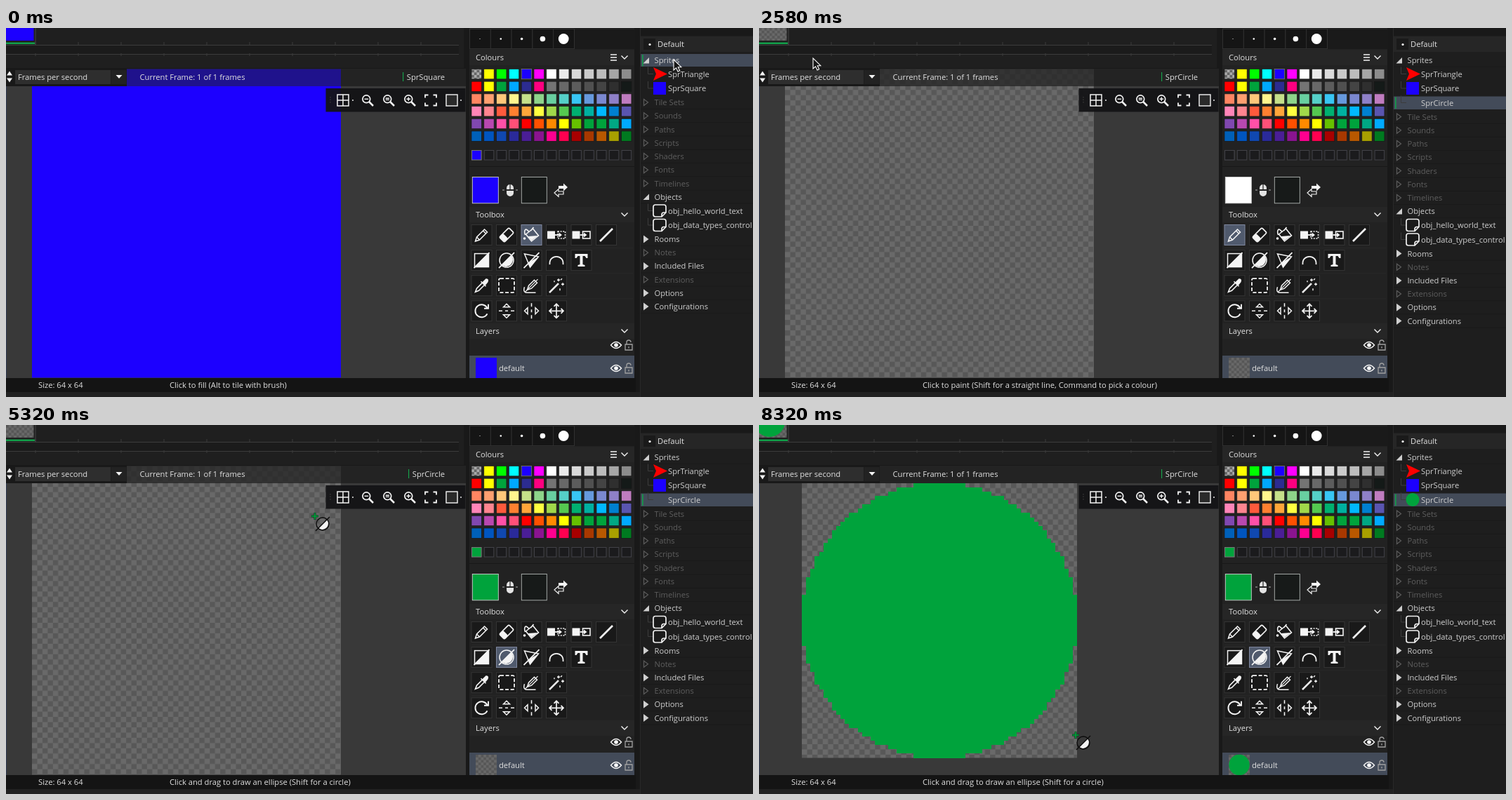
Recreate the animation shown at these times as an HTML page. Size 1064x526 px, loop 8340 ms.

```html
<!DOCTYPE html>
<html lang="en">
<head>
<meta charset="utf-8">
<title>Sprite editor</title>
<style>
html, body { margin: 0; width: 100%; height: 100%; overflow: hidden; background: #1d1d1d; }
svg { display: block; width: 100%; height: 100%; }
text { font: 11.18px "Open Sans", "Noto Sans", sans-serif; white-space: pre; }
</style>
</head>
<body>
<svg id="stage" viewBox="0 0 1064 526"></svg>
<script>
const LOOP = 8340;
const GREEN = '#00a33c', BLUE = '#1c00ff', SELECTED = '#434b59', FIELD = '#2e2e2e', TREE = '#cfcfcf';
const TOOL_ON = '#505a6d', TOOL_HOVER = '#3a4252', TOOL_OFF = '#191919';
const CELL = 7.45;
const NAME = 'SprCircle';
// moments of change, in ms
const CREATE = 420, TYPE = 480, ENTER = 1500, OPEN = 1900, PICK = 3350, ELLIPSE = 4350, ZOOM = 5750, DRAG = 6460, DROP = 8060;

// markup helpers
const rect = (x, y, w, h, fill, more = '') => `<rect x="${x}" y="${y}" width="${w}" height="${h}" fill="${fill}" ${more}/>`;
const path = (d, fill = 'none', stroke = 'none', w = 1.6, more = '') => `<path d="${d}" fill="${fill}" stroke="${stroke}" stroke-width="${w}" ${more}/>`;
const line = (d, w = 1.8, more = '') => path(d, 'none', '#f4f4f4', w, more);
const solid = (d, fill = '#f4f4f4') => path(d, fill);
const dot = (x, y, r, fill = '#fff', more = '') => `<circle cx="${x}" cy="${y}" r="${r}" fill="${fill}" ${more}/>`;
const text = (x, y, s, fill = '#e0e0e0', more = '') => `<text x="${x}" y="${y + 4}" fill="${fill}" ${more}>${s}</text>`;
const group = (more, s) => `<g ${more}>${s}</g>`;
const at = (x, y, s) => group(`transform="translate(${x} ${y})"`, s);
const down = (x, y) => solid(`M${x - 4.5} ${y - 2.5}h9l-4.5 5z`);
const spinner = (x, y) => solid(`M${x - 4} ${y - 2}h8l-4-6zM${x - 4} ${y + 2}h8l-4 6z`);
const chevron = (x, y) => line(`M${x - 4.5} ${y - 2.5}l4.5 4.5 4.5-4.5`, 1.4);
const checker = (id, size, a, b) => `<pattern id="${id}" width="${2 * size}" height="${2 * size}" patternUnits="userSpaceOnUse">
  ${rect(0, 0, 2 * size, 2 * size, a)}${rect(0, 0, size, size, b)}${rect(size, size, size, size, b)}</pattern>`;

// icons, centred on the origin
const lens = inner => dot(-1.7, -1.7, 5.4, 'none', 'stroke="#f4f4f4" stroke-width="1.7"') + line('M2.5 2.5L8 8', 2.5) + line(inner, 1.4);
const zoomOut = lens('M-4.5-1.7h5.6'), zoomFit = lens('M-4.3-2.8h5.2M-4.3-.6h5.2'), zoomIn = lens('M-4.5-1.7h5.6M-1.7-4.5v5.6');
const corners = line('M-8-3.5V-7.5h4.5M3.5-7.5H8v4M8 3.5V7.5H3.5M-3.5 7.5H-8V3.5');
const gridIcon = line('M-8-8H8V8H-8ZM0-8V8M-8 0H8', 1.5) + dot(14, 0, .9);
const boxIcon = rect(-8, -8, 16, 16, '#2a2a2a', 'stroke="#f4f4f4" stroke-width="1.4"') + dot(13, 0, .9);
const eye = line('M-7.5 0Q0-9 7.5 0Q0 9-7.5 0Z', 1.4) + dot(0, 0, 2.8);
const lock = path('M-5-1H5V7H-5ZM-3-1V-4A3 3 0 0 1 3-4M0 2v2.5', 'none', '#a0a0a0', 1.3);
const half = (r, bg) => dot(0, 0, r, bg) + solid(`M${r * .7} ${-r * .7}A${r} ${r} 0 0 1 ${-r * .7} ${r * .7}Z`);
const pencil = line('M-9 9L-7 3L4-8L8-4L-3 7ZM2-6L6-2M-7 3L-3 7', 1.5);
const copyTo = more => rect(-13, -5.5, 11, 11, '#f4f4f4') + rect(2, -5, 10.5, 10, 'none', `stroke="#f4f4f4" stroke-width="1.6" ${more}`) + line('M-2 0H4', 1.8) + solid('M3.5-3.5L8 0L3.5 3.5Z');
const mirror = line('M-11 0h5M-2 0h4M6 0h5', 1.6) + line('M-4.5-5.5L0-10L4.5-5.5ZM-4.5 5.5L0 10L4.5 5.5Z', 1.5);
const tools = [
  [pencil,
   group('transform="rotate(-45)"', rect(-9.5, -5, 19, 10, 'none', 'rx="2" stroke="#f4f4f4" stroke-width="1.7"') + rect(-9, -5, 7, 10, '#f4f4f4', 'rx="2"')),
   line('M-8-1L2-9L10 1L0 9ZM-3-4C-9-12-11-6-9 0M3-11l-4 5', 1.6) + solid('M-5 2L9 1L0 8Z') + dot(-10, 5, 1.8),
   copyTo('stroke-dasharray="2 1.6"'), copyTo(''), line('M-9 9L9-9', 2.6)],
  [rect(-10, -9.5, 20, 19, 'none', 'stroke="#f4f4f4" stroke-width="1.5"') + solid('M10-9.5V9.5H-10Z') + line('M-11 11L11-11'),
   half(10, 'none') + dot(0, 0, 10, 'none', 'stroke="#f4f4f4" stroke-width="1.5"') + line('M-11 11L11-11'),
   line('M-10-9L10-5L-2 10Z', 1.5) + solid('M10-5L-2 10L-5 4Z') + line('M-11 11L11-11'),
   line('M-9.5 6C-11-9 11-9 9.5 6', 1.8),
   solid('M-9-9H9V-3H7L5-6H2V6L5 7V9H-5V7L-2 6V-6H-5L-7-3H-9Z')],
  [line('M-9 9l2-5 8-8 3 3-8 8zM-1-6L6 1', 1.6) + solid('M1-5L6-10Q11-10 9-5L5 0Z'),
   rect(-11, -10, 22, 20, 'none', 'rx="2" stroke="#f4f4f4" stroke-width="1.8" stroke-dasharray="5 2.6"'),
   line('M-6 6l2-6 8-8 4 4-8 8zM-10 2Q-13 11-4 10H6', 1.5) + line('M-9 9L9-9', 1.2),
   line('M-10 10L3-3', 2.6) + line('M3-10v4M1-8h4M9-4v4M7-2h4M8-10l-2 2M-3-7v2M5 4v3', 1.4)],
  [line('M8-4A9 9 0 1 0 8 4M9.5-9.5V-3.5H3.5', 1.9), mirror, group('transform="rotate(90)"', mirror),
   line('M-9 0H9M0-9V9M-3.5-6.5L0-10L3.5-6.5M-3.5 6.5L0 10L3.5 6.5M-6.5-3.5L-10 0L-6.5 3.5M6.5-3.5L10 0L6.5 3.5', 1.7)]
];
const toolX = i => 677.5 + 35.5 * i, toolY = j => 295 + 36.1 * j;

const palette = [
  'url(#swatch) #ffff00 #00ff00 #00ffff #1c00ff #ff00ff #ffffff #eaeaea #dadada #cacaca #bcbcbc #a6a6a6 #8c8c8c',
  '#ff0000 #ffff00 #00a33c #00a8ff #2c2c90 #ff0080 #747474 #686868 #5c5c5c #505050 #444444 #2f2f2f #141a18',
  '#ff8562 #ffa070 #ffc87a #fff58e #c5e08a #8ed48a #68cfa0 #55d0c8 #38c6f4 #6699dd #7a88d0 #8f80c8 #c07cc0',
  '#ff85b8 #ff8590 #ff5a3c #ff8030 #ffa63a #ffff40 #a0d84a #55c850 #00b070 #00b0a0 #00b8ff #0080d0 #5a55b0',
  '#8048b0 #b848b0 #ff50a8 #ff5078 #ff0000 #ff5000 #ff8a00 #ffff00 #66c000 #00a33c #00a33c #00a884 #00aaff',
  '#0060b8 #0055c0 #1048b0 #2a2a9a #4a1e96 #8a1490 #ff0090 #ff0050 #a80000 #a83800 #b85800 #a8a000 #007a20'
];

function colours() {
  let s = rect(660, 2, 236, 28, '#1a1a1a') + rect(660, 31, 235, 22, '#262626') + text(669, 42, 'Colours');
  [.6, 1.3, 1.8, 3.8, 7.4].forEach((r, i) => {
    s += rect(660.5 + 29.8 * i, 1.5, 29.8, 28, '#151515', 'stroke="#303030"') + dot(675 + 29.8 * i, 15.5, r);
  });
  s += line('M861 38h9M861 42h9M861 46h9', 1.7) + chevron(881, 42);
  palette.forEach((row, j) => row.split(' ').forEach((c, i) => {
    s += rect(663 + 17.8 * i, 58.5 + 17.7 * j, 14.3, 14.3, c, 'stroke="#151515" stroke-width=".6"');
  }));
  s += rect(734.2, 58.5, 14.3, 14.3, 'none', 'stroke="#888" stroke-width=".7"');
  for (let i = 0; i < 13; i++) s += rect(663.5 + 17.8 * i, 174.5, 13.5, 13.5, '#1b1b1d', 'stroke="#424248"');
  s += rect(663.5, 174.5, 13.5, 13.5, BLUE, 'id="recent" stroke="#777"');
  s += rect(660, 197, 235, 1, '#181818');
  s += rect(664.3, 212.5, 37, 37.3, BLUE, 'id="ink" stroke="#d0d0d0" stroke-width=".9"') + rect(734.3, 212.5, 36, 37.3, '#171a19', 'stroke="#b0b6b3" stroke-width=".9"');
  s += at(718, 231, path('M-5-1V-3A5 5 0 0 1 5-3V-1ZM-5 1H5V4A5 5 0 0 1-5 4Z', '#e4e4e4') + path('M0-8V0', 'none', '#222', 1.2) + line('M-11 0h3M8 0h3', .7));
  return s + at(790, 231, solid('M-3-6H4V-9.5L10-4L4 1.5V-2H-3Z') + path('M4 2H-3V-1.5L-9 4L-3 9.5V6H4Z', '#222', '#f4f4f4', 1.2));
}

function toolbox() {
  let s = rect(660, 255, 235, 22, '#262626') + text(669, 265.5, 'Toolbox') + chevron(881, 266);
  tools.forEach((row, j) => {
    if (j) s += rect(663, toolY(j) - 18, 230, 1, '#292929');
    row.forEach((icon, i) => {
      s += at(toolX(i), toolY(j), rect(-14.5, -14.5, 29, 29, TOOL_OFF, `id="tool${j}${i}" stroke="#343434"`) + icon);
    });
  });
  return s;
}

function layers() {
  return rect(660, 421, 235, 22, '#262626') + text(669, 431.5, 'Layers') + chevron(881, 432)
    + at(869, 452, eye) + at(887, 452, lock) + rect(660, 467, 235, 32, SELECTED)
    + at(669, 470, rect(0, 0, 30, 29, BLUE, 'id="layer"')) + dot(684, 484.5, 14.7, GREEN, 'class="done"')
    + text(702, 485, 'default') + at(869, 485, eye) + at(887, 485, lock);
}

function imageEditor() {
  let ticks = '';
  for (let x = 42; x < 645; x += 61) ticks += `M${x} 20v4M${x} 36v4`;
  return rect(0, 0, 903, 526, '#191919') + rect(0, 0, 652, 57, '#1f1f1f') + rect(0, 25, 645, 12, '#1b1b1b')
    + path(`M0 24.5H645M0 37.5H645${ticks}`, 'none', '#3c3c3c', 1)
    + rect(0, 0, 39.5, 18, BLUE, 'id="thumb"') + group('clip-path="url(#thumbClip)"', dot(15, -5, 22, GREEN, 'class="done"'))
    + rect(0, 20.5, 41, 2.5, '#12a04a') + rect(41.5, 0, 1, 24, '#454545')
    + rect(0, 58, 655, 441, '#393939') + rect(0, 58, 655, 25, '#232323')
    + at(37, 58.5, rect(135, 0, 305, 24.5, BLUE, 'id="headTint"'))
    + group('clip-path="url(#view)"', group('id="sheet"', rect(0, 0, 440, 440, BLUE, 'id="paper"') + path('', GREEN, 'none', 0, 'id="disc" shape-rendering="crispEdges"')))
    + rect(0, 83, 1, 416, '#303a52')
    + rect(0, 58, 172, 25, '#191919') + rect(13, 60, 136, 20, FIELD) + rect(149.5, 60, 22, 20, '#222')
    + spinner(5, 69.5) + text(17, 69.5, 'Frames per second') + down(161, 69.5)
    + text(190.5, 69.5, 'Current Frame: 1 of 1 frames')
    + rect(565, 63, 1.2, 13, '#16a04a', 'id="nameBar"') + text(625, 69.5, '', '#e0e0e0', 'id="title" text-anchor="end"')
    + rect(455.5, 86, 199, 33.5, '#141416', 'opacity=".94"') + path('M462 98v10', 'none', '#444', 1, 'stroke-dasharray="1.5 2"')
    + [gridIcon, zoomOut, zoomFit, zoomIn, corners, boxIcon].map((s, i) => at([480, 515, 545, 575, 605, 635][i], 103, s)).join('')
    + rect(655, 0, 5, 499, '#191919') + rect(660, 0, 235, 499, '#222') + colours() + toolbox() + layers()
    + rect(0, 499, 897, 20, '#141414') + rect(0, 519, 903, 7, '#212121')
    + text(46, 509, 'Size: 64 x 64') + text(233, 509, '', '#e0e0e0', 'id="hint"');
}

function spriteEditor() {
  let ticks = '';
  for (let x = 123; x < 823; x += 66.6) ticks += `M${x} 105v5M${x} 121v4`;
  const button = (y, s) => rect(8.5, y - 10, 93, 20, '#151515', 'stroke="#363636"') + text(55, y, s, '#e0e0e0', 'text-anchor="middle"');
  return rect(0, 0, 903, 526, '#1c1c1c') + rect(830, 0, 73, 526, 'url(#glow)') + rect(846, 0, 1, 515, '#161616')
    + rect(0, 0, 831, 506, '#212121') + rect(0, 12, 112, 1, '#181818')
    + button(51.5, 'Edit Image') + button(84, 'Import')
    + rect(0, 104, 112, 18, '#272727') + text(22, 169, 'Page', '#e0e0e0', 'text-anchor="end"') + rect(0, 235, 95, 21, FIELD)
    + rect(73.5, 235, 21, 21, '#222') + down(84, 245.5) + rect(0, 267, 112, 20, '#2a2a2a') + rect(112, 0, 5, 504, '#1a1a1a')
    + rect(124, -2, 23, 21, '#171717', 'stroke="#333"') + path('M132 3.5L140 9L132 14.5Z', 'none', '#f4f4f4', 1.4)
    + rect(152, -2, 23, 21, TOOL_ON, 'stroke="#6a7484"') + line('M161 13h-3V5h11v8h-4', 1.6) + solid('M166 9.5v7l-5-3.5z')
    + text(204, 9, 'Speed:') + rect(241, -1, 36, 20, '#191919') + text(245, 9, '15') + spinner(283, 9)
    + rect(290, -1, 159, 20, FIELD) + rect(428, -1, 21, 20, '#222') + text(295, 9, 'Frames per second') + down(439, 9)
    + text(464, 9, 'Current Frame: 1 of 1 frames')
    + rect(117, 25, 711, 112, '#1e1e1e') + rect(124, 38, 64, 70, '#111', 'stroke="#343434"')
    + dot(155, 73, 6.8, 'none', 'stroke="#f4f4f4" stroke-width="1.5"') + line('M151 73h8M155 69v8', 1.5)
    + rect(190, 38, 65, 70, '#191919', 'stroke="#343434"') + at(193.5, 42, rect(0, 0, 59, 59, 'url(#small)', 'stroke="#8a8a8a"'))
    + rect(192, 104, 62, 3, '#12a04a') + rect(190, 111, 65, 9, '#191919')
    + path(`M123 109.5H823M123 121.5H823${ticks}`, 'none', '#3c3c3c', 1) + rect(470.5, 145, 3.5, 2.5, '#888')
    + rect(117.5, 160, 15.5, 16, '#333') + text(139, 168, 'Preview Mask') + text(223, 168, 'Origin: 0') + text(309, 168, 'x 0') + at(374, 168, lock)
    + rect(386, 157, 111, 22, FIELD) + rect(476, 157, 21, 22, '#222') + text(390, 168, 'Top Left') + down(487, 168)
    + rect(117, 190, 712, 314, '#1d1d1d') + at(317, 198, rect(0, 0, 298, 297.5, 'url(#light)'))
    + rect(298, 198, 42, 5, '#111', 'opacity=".7"') + rect(317, 190, 5, 30, '#111', 'opacity=".7"')
    + rect(719, 198, 102, 24, '#191919') + [zoomOut, zoomFit, zoomIn, corners].map((s, i) => at(739 + 22.6 * i, 210, s)).join('')
    + rect(830, 0, 1.5, 506, '#303030') + rect(0, 505, 831, 1.5, '#303030') + rect(0, 517, 903, 1, '#151515') + rect(0, 518, 903, 8, '#212121');
}

function tree() {
  const row = (y, s, kind) => {
    const mark = { open: solid(`M907.5 ${y + 4.5}h8.5v-8.5z`, TREE), full: solid(`M908 ${y - 5.5}l7.5 5.5-7.5 5.5z`, TREE), none: path(`M908.5 ${y - 4.5}l6 4.5-6 4.5z`, 'none', '#5c5c5c', 1.2) }[kind];
    return rect(904, y + 9.2, 160, .8, '#191919') + mark + text(923.5, y, s, kind == 'none' ? '#5e5e5e' : TREE);
  };
  const branch = y => path(`M914.5 ${y - 10}V${y}H922`, 'none', '#3c3c3c', 1);
  const object = (y, s) => branch(y) + path(`M925 ${y - 8.5}h12q3 0 3 3v8l-6 6h-9q-3 0-3-3v-11q0-3 3-3zM940 ${y + 2.5}h-3q-3 0-3 3v3`, '#1a1a1a', '#f0f0f0', 1.7) + text(943, y, s, TREE);
  const empty = ['Tile Sets', 'Sounds', 'Paths', 'Scripts', 'Shaders', 'Fonts', 'Timelines'].map((s, i) => row(106 + 19.25 * i, s, 'none')).join('');
  const rest = ['Rooms', 'Notes', 'Included Files', 'Extensions', 'Options', 'Configurations'].map((s, i) => row(301 + 19.2 * i, s, i % 2 && i < 5 ? 'none' : 'full')).join('');
  return rect(903, 0, 161, 526, '#1e1e1e') + rect(903, 0, 1, 526, '#292929') + rect(904, 0, 160, 11, '#191919') + rect(904, 12, 160, 22, '#262626')
    + rect(908, 15, 17, 16, '#1a1a1a') + dot(917, 23.5, 1.6) + text(928, 23, 'Default')
    + rect(904, 37, 160, 18.5, SELECTED, 'id="mark"') + rect(906, 38, 1.6, 16.5, '#12a04a', 'id="markBar"')
    + row(46, 'Sprites', 'open')
    + branch(65.5) + path('M922 56l20 9.5-20 9.5 4-9.5z', '#ff0000') + text(943, 65.5, 'SprTriangle', TREE)
    + branch(86) + rect(922, 77, 18, 18, BLUE) + text(943, 86, 'SprSquare', TREE)
    + group('id="circleRow"', branch(106.5) + dot(931, 106.5, 9.5, GREEN, 'class="done"') + text(943, 106.5, '', TREE, 'id="typed"') + rect(0, 100, 1, 13, '#fff', 'id="caret"'))
    + group('id="lower"', empty + row(240.5, 'Objects', 'open') + object(260.5, 'obj_hello_world_text') + object(281, 'obj_data_types_control') + rest);
}

const $ = id => document.getElementById(id);
$('stage').innerHTML = `<defs>${checker('dark', CELL, '#696969', '#585858')}${checker('light', CELL, '#797979', '#adadad')}
  ${checker('small', CELL / 2, '#686868', '#575757')}${checker('swatch', CELL / 2, '#aaaaaa', '#666666')}
  <clipPath id="view">${rect(0, 83, 655, 416, '#000')}</clipPath><clipPath id="thumbClip">${rect(0, 0, 39.5, 18, '#000')}</clipPath>
  <radialGradient id="glow" cx=".3" cy=".5" r=".6"><stop offset="0" stop-color="#212121"/><stop offset="1" stop-color="#191919"/></radialGradient></defs>`
  + group('id="image"', imageEditor()) + group('id="sprite"', spriteEditor()) + tree()
  + group('id="arrow"', path('M0 0V15L3.5 11.8L6 17L8.7 15.8L6.2 10.7H10.8Z', '#161616', '#fff', 1.1))
  + group('id="cross"', path('M-5 0H5M0-5V5', 'none', '#0b3a1c', 3) + path('M-4.5 0H4.5M0-4.5V4.5', 'none', GREEN, 1.6)
    + at(11, 11, half(8.8, 'none') + dot(0, 0, 9, 'none', 'stroke="#0c0c0c" stroke-width="1.4"') + path('M-10 10L10-10', 'none', '#0c0c0c', 1.4)));

// pointer stops: time, x, y
const stops = [
  [0, 951, 45], [250, 951, 45], [CREATE, 972, 57], [1280, 972, 57], [1660, 62, 50], [2200, 62, 50],
  [2520, 77, 43], [2620, 77, 43], [3260, 705, 84], [3450, 705, 84], [3780, 752, 299], [3900, 754, 314],
  [4250, 714, 331], [4450, 714, 331], [5250, 440, 130], [5800, 440, 130], [6330, 65, 87], [DRAG, 65, 87],
  [7950, 451, 442], [LOOP, 451, 442]
];
function pointer(t) {
  const i = Math.max(1, stops.findIndex(s => s[0] >= t));
  const [t0, x0, y0] = stops[i - 1], [t1, x1, y1] = stops[i];
  const u = (t - t0) / (t1 - t0), k = u * u * (3 - 2 * u);
  return [x0 + (x1 - x0) * k, y0 + (y1 - y0) * k];
}

// filled circle of n by n pixels, one strip per row
function disc(n, px) {
  let d = '';
  for (let i = 0, r = n / 2; i < n; i++) {
    const x = Math.round(r - Math.sqrt(r * r - (i + .5 - r) ** 2)), w = n - 2 * x;
    d += `M${x * px} ${i * px}h${w * px}v${px}h${-w * px}z`;
  }
  return d;
}

const set = (id, values) => { for (const k in values) $(id).setAttribute(k, values[k]); };
const show = (el, on) => el.setAttribute('visibility', on ? 'visible' : 'hidden');
const move = (id, x, y) => set(id, { transform: `translate(${x} ${y})` });

function draw(t) {
  const [x, y] = pointer(t);
  const made = t >= CREATE, editing = !made || t >= OPEN, ellipse = t >= ELLIPSE, zoomed = t >= ZOOM;
  $('image').style.display = editing ? '' : 'none';
  $('sprite').style.display = editing ? 'none' : '';
  document.querySelectorAll('.done').forEach(el => show(el, t >= DROP));

  const typed = NAME.slice(0, Math.max(0, Math.floor((t - TYPE) / 100)));
  $('typed').textContent = typed;
  $('circleRow').style.display = made ? '' : 'none';
  $('caret').style.display = made && t < ENTER ? '' : 'none';
  set('caret', { x: 943 + (made ? $('typed').getComputedTextLength() : 0) });
  set('mark', { y: made ? 97.5 : 37 });
  set('markBar', { y: made ? 98.5 : 38 });
  move('lower', 0, made ? 20.5 : 0);

  const ink = !made ? BLUE : t < PICK ? '#ffffff' : GREEN;
  const unused = made && t < PICK;
  set('ink', { fill: ink });
  set('recent', { fill: unused ? '#1b1b1d' : ink, stroke: unused ? '#424248' : '#777' });
  set('thumb', { fill: made ? 'url(#small)' : BLUE });
  set('layer', { fill: made ? 'url(#small)' : BLUE });
  set('headTint', { fill: made ? 'url(#dark)' : BLUE, opacity: zoomed ? 0 : made ? .24 : .48 });
  $('title').textContent = made ? NAME : 'SprSquare';
  set('nameBar', { x: made ? 573 : 565 });
  $('hint').textContent = !made ? 'Click to fill (Alt to tile with brush)'
    : ellipse ? 'Click and drag to draw an ellipse (Shift for a circle)'
    : 'Click to paint (Shift for a straight line, Command to pick a colour)';

  const size = zoomed ? 392 : 440, left = zoomed ? 61 : 37, top = zoomed ? 82.5 : 58.5, px = size / 64;
  move('sheet', left, top);
  set('paper', { width: size, height: size, fill: made ? 'url(#dark)' : BLUE });
  const n = Math.min(64, Math.floor(Math.max(x - left, y - top) / px) + 1);
  set('disc', { d: t >= DRAG ? disc(n, px) : '' });

  const active = !made ? '02' : ellipse ? '11' : '00';
  tools.forEach((row, j) => row.forEach((_, i) => {
    const on = active === `${j}${i}`;
    const over = editing && Math.abs(x - toolX(i)) < 15 && Math.abs(y - 5 - toolY(j)) < 15;
    set(`tool${j}${i}`, { fill: on ? TOOL_ON : over ? TOOL_HOVER : TOOL_OFF, stroke: on ? '#8088a0' : '#343434' });
  }));

  const drawing = ellipse && x < 655 && y > 83;
  show($('arrow'), !drawing);
  show($('cross'), drawing);
  move('arrow', x, y);
  move('cross', x, y);
}

const start = performance.now();
function tick() {
  draw((performance.now() - start) % LOOP);
  requestAnimationFrame(tick);
}
tick();
</script>
</body>
</html>
```
